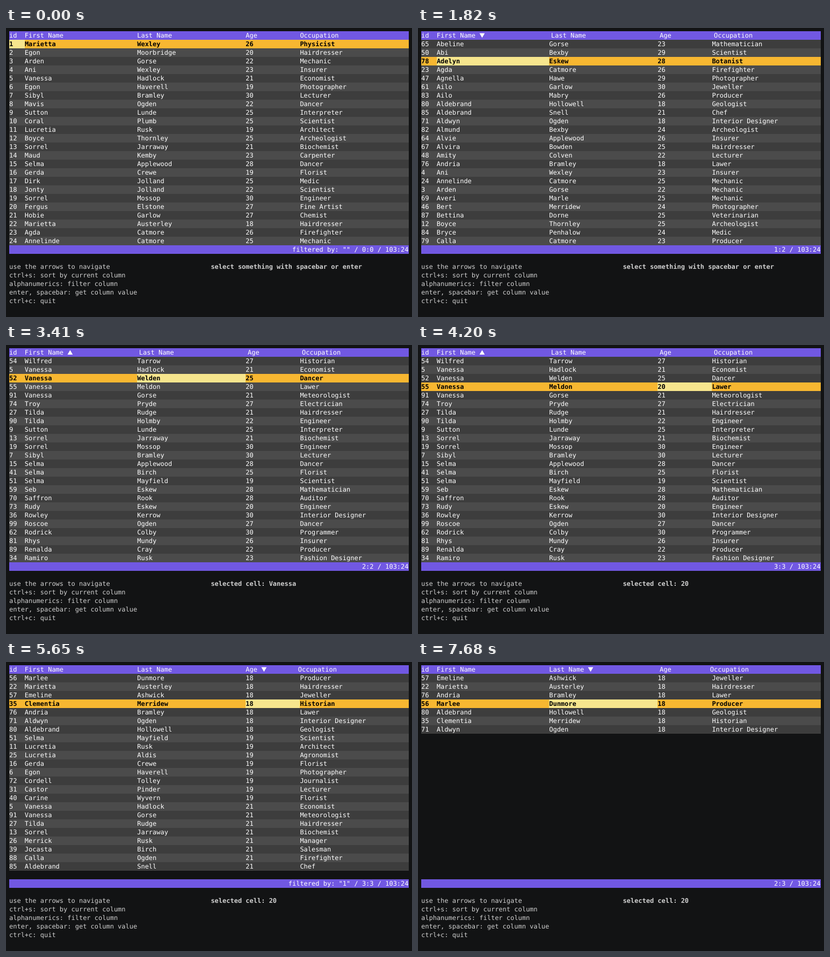
An HTML page for the animation above (8000 ms loop, 756x540 px).

```html
<!DOCTYPE html>
<html lang="en">
<head>
<meta charset="utf-8">
<title>Sortable table</title>
<style>
  html, body { margin: 0; width: 100%; height: 100%; overflow: hidden; background: #121314; }
  #screen {
    position: absolute; left: 6px; top: 6px; width: 744px; height: 528px;
    font: 12px/16px "DejaVu Sans Mono", monospace;
    text-rendering: geometricPrecision;
    letter-spacing: -.006px; /* terminal cell pitch, in whole 1/64 px */
    white-space: pre; color: #d0d0d0;
  }
  #screen div { height: 16px; overflow: hidden; }
  #screen span { display: inline-block; height: 16px; vertical-align: top; }
  #screen .bar { background: #7158e2; color: #fff; }
  .even { background: #3d3d3d; color: #fff; }
  .odd { background: #4b4b4b; color: #fff; }
  #screen .cur { background: #f7b731; color: #000; font-weight: bold; }
  .cell { background: #f6e58d; }
  svg { width: 10.83px; height: 16px; vertical-align: top; fill: #fff; }
</style>
</head>
<body>
<div id="screen"></div>
<script>
const people = `
1 Marietta Wexley 26 Physicist
2 Egon Moorbridge 20 Hairdresser
3 Arden Gorse 22 Mechanic
4 Ani Wexley 23 Insurer
5 Vanessa Hadlock 21 Economist
6 Egon Haverell 19 Photographer
7 Sibyl Bramley 30 Lecturer
8 Mavis Ogden 22 Dancer
9 Sutton Lunde 25 Interpreter
10 Coral Plumb 25 Scientist
11 Lucretia Rusk 19 Architect
12 Boyce Thornley 25 Archeologist
13 Sorrel Jarraway 21 Biochemist
14 Maud Kemby 23 Carpenter
15 Selma Applewood 28 Dancer
16 Gerda Crewe 19 Florist
17 Dirk Jolland 25 Medic
18 Jonty Jolland 22 Scientist
19 Sorrel Mossop 30 Engineer
20 Fergus Elstone 27 Fine Artist
21 Hobie Garlow 27 Chemist
22 Marietta Austerley 18 Hairdresser
23 Agda Catmore 26 Firefighter
24 Annelinde Catmore 25 Mechanic
25 Lucretia Aldis 19 Agronomist
26 Merrick Rusk 21 Manager
27 Tilda Rudge 21 Hairdresser
31 Castor Pinder 19 Lecturer
33 Phoebe Tarrow 20 Chemist
34 Ramiro Rusk 23 Fashion Designer
35 Clementia Merridew 18 Historian
36 Rowley Kerrow 30 Interior Designer
39 Jocasta Birch 21 Salesman
40 Carine Wyvern 19 Florist
41 Selma Birch 25 Florist
46 Bert Merridew 24 Photographer
47 Agnella Hawe 29 Photographer
48 Amity Colven 22 Lecturer
50 Abi Bexby 29 Scientist
51 Selma Mayfield 19 Scientist
52 Vanessa Welden 25 Dancer
54 Wilfred Tarrow 27 Historian
55 Vanessa Meldon 20 Lawer
56 Marlee Dunmore 18 Producer
57 Emeline Ashwick 18 Jeweller
59 Seb Eskew 28 Mathematician
60 Norton Colven 20 Auditor
61 Ailo Garlow 30 Jeweller
62 Rodrick Colby 30 Programmer
64 Alvie Applewood 26 Insurer
65 Abeline Gorse 23 Mathematician
67 Alvira Bowden 25 Hairdresser
69 Averi Marle 25 Mechanic
70 Saffron Rook 28 Auditor
71 Aldwyn Ogden 18 Interior Designer
72 Cordell Tolley 19 Journalist
73 Rudy Eskew 20 Engineer
74 Troy Pryde 27 Electrician
76 Andria Bramley 18 Lawer
78 Adelyn Eskew 28 Botanist
79 Calla Catmore 23 Producer
80 Aldebrand Hollowell 18 Geologist
81 Rhys Mundy 26 Insurer
82 Almund Bexby 24 Archeologist
83 Ailo Mabry 26 Producer
84 Bryce Penhalow 24 Medic
85 Aldebrand Snell 21 Chef
87 Bettina Dorne 25 Veterinarian
88 Calla Ogden 21 Firefighter
89 Renalda Cray 22 Producer
90 Tilda Holmby 22 Engineer
91 Vanessa Gorse 21 Meteorologist
94 Leopold Plumb 20 Dancer
99 Roscoe Ogden 27 Dancer`.trim().split('\n').map(line => {
  const [id, first, last, age, ...job] = line.split(' ');
  return [id, first, last, age, job.join(' ')];
});

const titles = ['id', 'First Name', 'Last Name', 'Age', 'Occupation'];
const widths = [4, 29, 28, 14, 28];
const help = [
  'use the arrows to navigate',
  'ctrl+s: sort by current column',
  'alphanumerics: filter column',
  'enter, spacebar: get column value',
  'ctrl+c: quit'
];
const COLS = 103, ROWS = 24, LOOP = 8000;

// [time in ms, key]; digits are typed into the filter
const keys = [
  [0, ''], [500, 'down'], [630, 'down'], [960, 'right'],
  [1820, 'sort'], [2410, 'sort'], [3010, 'pick'],
  [3410, 'right'], [3540, 'down'], [3800, 'pick'],
  [4000, 'right'], [4200, 'pick'], [4590, 'sort'],
  [5650, '1'], [5780, '8'], [7280, 'left'], [7680, 'sort']
];

const ui = {
  rows: people, col: 0, row: 0, sortCol: -1, desc: false,
  filter: '', filterCol: 0, info: 'select something with spacebar or enter'
};

const visible = () =>
  ui.rows.filter(r => r[ui.filterCol].includes(ui.filter)).slice(0, ROWS);

function sort() {
  const c = ui.col;
  ui.desc = ui.sortCol === c && !ui.desc;
  ui.sortCol = c;
  const sign = ui.desc ? -1 : 1;
  ui.rows = [...ui.rows].sort((a, b) => sign * ((a[c] > b[c]) - (a[c] < b[c])));
}

function press(key) {
  if (key === 'down') ui.row++;
  else if (key === 'right') ui.col++;
  else if (key === 'left') ui.col--;
  else if (key === 'sort') sort();
  else if (key === 'pick') ui.info = 'selected cell: ' + visible()[ui.row][ui.col];
  else if (key) {
    ui.filter += key;
    ui.filterCol = ui.col;
  }
}

const line = (cls, html) => `<div class="${cls}">${html}</div>`;
const arrow = desc =>
  `<svg viewBox="0 0 10.83 16"><path d="${desc ? 'M.5 12L5.4 3.6L10.3 12Z' : 'M.5 3.8H10.3L5.4 12.2Z'}"/></svg>`;

function header() {
  return titles.map((title, i) => {
    let room = widths[i] - title.length;
    // an active filter takes one cell out of its heading
    if (ui.filter && i === ui.filterCol) room--;
    return i === ui.sortCol
      ? title + ' ' + arrow(ui.desc) + ' '.repeat(room - 2)
      : title + ' '.repeat(room);
  }).join('');
}

function tableRow(r, y) {
  const current = y === ui.row;
  const cells = r.map((text, x) => {
    const cell = text.padEnd(widths[x]);
    return current && x === ui.col ? `<span class="cell">${cell}</span>` : cell;
  });
  return line(current ? 'cur' : y % 2 ? 'odd' : 'even', cells.join(''));
}

function draw() {
  const rows = visible();
  const note = ui.col === ui.filterCol ? `filtered by: "${ui.filter}" / ` : '';
  const status = `${note}${ui.col}:${ui.row} / 103:24`;
  return line('bar', header())
    + rows.map(tableRow).join('')
    + line('', '').repeat(ROWS - rows.length)
    + line('bar', status.padStart(COLS))
    + line('', '')
    + help.map((h, i) => line('', i ? h : h.padEnd(52) + `<b>${ui.info}</b>`)).join('');
}

const scenes = keys.map(([at, key]) => {
  press(key);
  return { at, html: draw() };
});

const screenEl = document.getElementById('screen');
let shown;

function tick() {
  const t = performance.now() % LOOP;
  const scene = scenes.filter(s => s.at <= t).pop();
  if (scene !== shown) {
    shown = scene;
    screenEl.innerHTML = scene.html;
  }
  requestAnimationFrame(tick);
}
tick();
</script>
</body>
</html>
```
